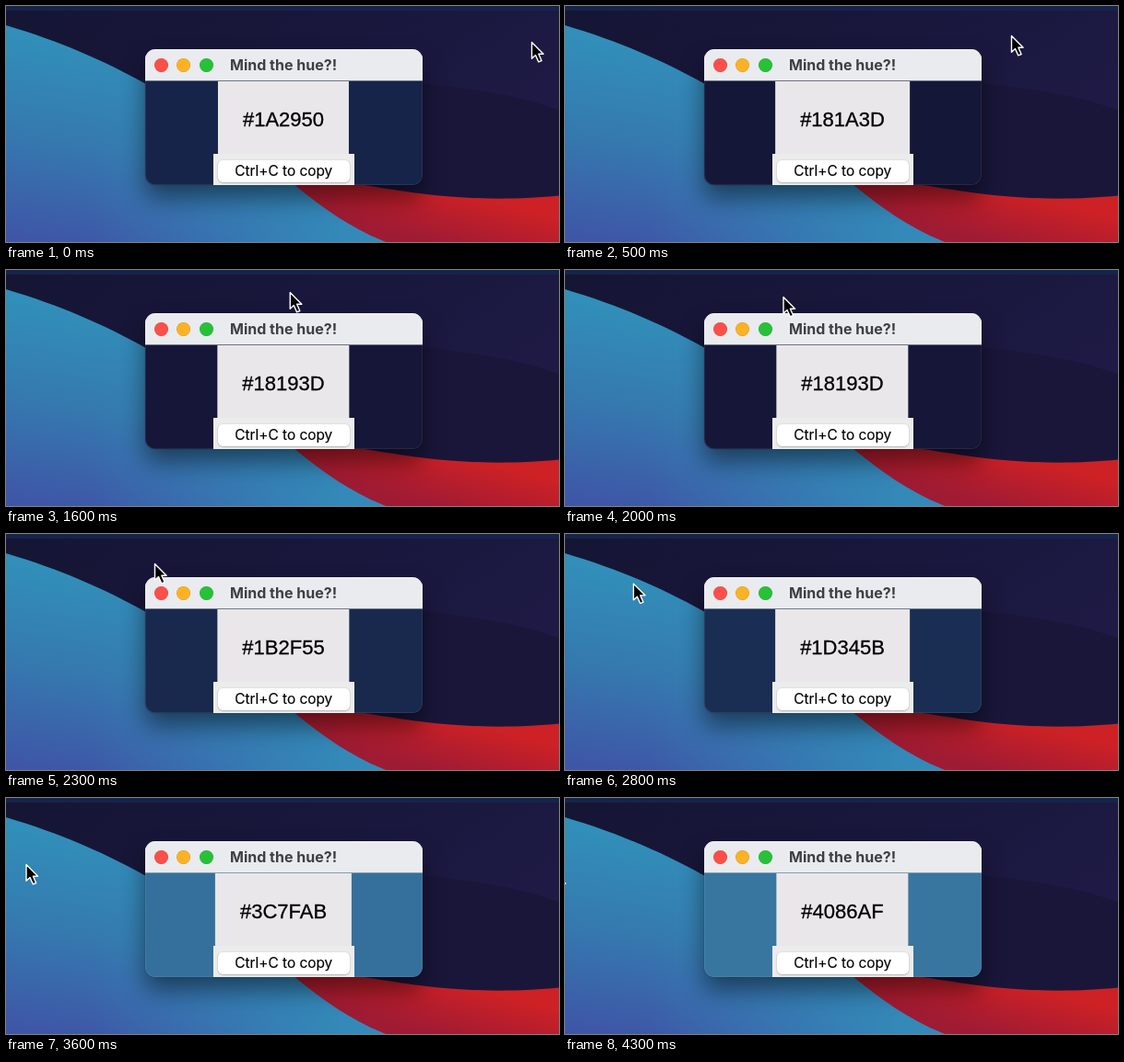
These frames come from a looping animation (600 px wide and 257 px high, 4.4 s). An HTML page:

```html
<!DOCTYPE html>
<html lang="en">
<head>
<meta charset="utf-8">
<title>Colour picker</title>
<style>
  html, body { margin: 0; width: 100%; height: 100%; overflow: hidden; background: #19163a; }
  #stage { position: relative; width: 600px; height: 257px; overflow: hidden; }
  #stage > svg { position: absolute; left: 0; top: 0; }
  #window, #shadow {
    position: absolute; left: 151px; top: 47px; width: 301px; height: 147.5px; border-radius: 11px;
  }
  #window { overflow: hidden; }
  #shadow { box-shadow: 0 14px 26px rgba(0, 0, 0, .48), 0 0 1px rgba(0, 0, 0, .6); }
  #bar { position: absolute; inset: 0 0 auto; height: 34px; background: #e9ebee; box-shadow: 0 .5px 0 #c9c9cd; }
  #bar i { position: absolute; top: 10px; width: 15px; height: 15px; border-radius: 50%; box-shadow: inset 0 0 0 .5px rgba(0, 0, 0, .15); }
  #bar b { position: absolute; left: 92px; top: 6.5px; font: 700 16px/21px Inter, sans-serif; color: #3e3f42; white-space: pre; }
  #label {
    position: absolute; left: 150px; top: 34.5px; height: 80px; padding: 0 27px;
    transform: translateX(-50%); background: #e9e7e9; color: #000;
    font: 22px/83px "Liberation Sans", Arial, sans-serif; white-space: pre;
    -webkit-text-stroke: .3px #000;
  }
  #foot { position: absolute; left: 74px; top: 113.5px; width: 153px; height: 34px; background: #ececec; }
  #foot span {
    position: absolute; left: 5px; top: 7.5px; width: 142.5px; height: 24px; border-radius: 5px;
    background: #fff; box-shadow: 0 .5px 1.5px rgba(0, 0, 0, .4);
    font: 15.4px/24px Inter, sans-serif; color: #000; text-align: center; white-space: pre;
    -webkit-text-stroke: .15px #000;
  }
  #rim { position: absolute; inset: 0; border-radius: 11px; box-shadow: inset 0 0 0 .7px rgba(255, 255, 255, .1); }
</style>
</head>
<body>
<div id="stage">
  <svg width="600" height="257" viewBox="0 0 600 257">
    <defs>
      <linearGradient id="night" x1="0" y1="0" x2="1" y2=".6">
        <stop offset="0" stop-color="#151534"/><stop offset=".5" stop-color="#19173c"/><stop offset="1" stop-color="#1f1b48"/>
      </linearGradient>
      <linearGradient id="sea" gradientUnits="userSpaceOnUse" x1="70" y1="40" x2="35" y2="275">
        <stop offset="0" stop-color="#318fb9"/><stop offset=".45" stop-color="#3579af"/><stop offset="1" stop-color="#4050a5"/>
      </linearGradient>
      <linearGradient id="glow" gradientUnits="userSpaceOnUse" x1="90" y1="0" x2="370" y2="0">
        <stop offset="0" stop-color="#3385b6" stop-opacity="0"/><stop offset="1" stop-color="#338ab9"/>
      </linearGradient>
      <linearGradient id="flame" gradientUnits="userSpaceOnUse" x1="490" y1="203" x2="475" y2="260">
        <stop offset="0" stop-color="#cd2125"/><stop offset=".4" stop-color="#bb1e2b"/><stop offset="1" stop-color="#9f1b34"/>
      </linearGradient>
      <path id="wave" d="M0 21C60 39 105 59 151 84.5C230 128 270 160 313 195C345 221 374 242 412 257H0Z"/>
    </defs>
    <rect width="600" height="257" fill="url(#night)"/>
    <path d="M380 82C450 82 490 88 530 95S580 107 600 113V257H380Z" fill="#1a163a"/>
    <path d="M290 178C350 189 410 199 452 204.5C510 211.5 560 210.5 600 206.5V257H290Z" fill="url(#flame)"/>
    <use href="#wave" fill="url(#sea)"/>
    <use href="#wave" fill="url(#glow)"/>
    <rect width="600" height="5" fill="#15244a"/>
  </svg>
  <div id="shadow"></div>
  <div id="window">
    <div id="bar">
      <i style="left:9.5px;background:#fc4f49"></i>
      <i style="left:34px;background:#fdb224"></i>
      <i style="left:58.5px;background:#27c138"></i>
      <b>Mind the hue?!</b>
    </div>
    <div id="label"></div>
    <div id="foot"><span>Ctrl+C to copy</span></div>
    <div id="rim"></div>
  </div>
  <svg width="600" height="257" viewBox="0 0 600 257">
    <path id="cursor" d="M0 .6V18.2L4 14.5L7.3 21.9L10.6 20.5L7.4 13.2H12.6Z"
      fill="#000" stroke="#fff" stroke-width="1.4" stroke-linejoin="round"/>
  </svg>
</div>
<script>
  const LOOP = 4400, STEP = 100;

  // time, x, y of the pointer tip
  const path = [
    [0, 570.5, 39], [500, 484.5, 32], [1200, 379.5, 19], [2000, 237, 29], [2300, 161.5, 32],
    [2400, 138, 36], [2700, 85, 50], [3000, 53, 61], [3200, 40.5, 65], [3600, 22, 72],
    [4200, -9, 79], [4300, -12, 80]
  ];

  // time, sampled colour
  const samples = [
    [0, '1A2950'], [300, '181A3D'], [1600, '18193D'], [2200, '1B2F55'],
    [2700, '1D345B'], [3500, '3C7FAB'], [3900, '4086AF']
  ];

  const label = document.getElementById('label');
  const body = document.getElementById('window');
  const cursor = document.getElementById('cursor');

  function pointAt(t) {
    const next = path.findIndex(p => p[0] > t);
    if (next < 0) return path[path.length - 1].slice(1);
    const [a, b] = [path[next - 1], path[next]];
    const k = (t - a[0]) / (b[0] - a[0]);
    return [1, 2].map(i => a[i] + (b[i] - a[i]) * k);
  }

  // The display profile renders the sampled value slightly darker.
  function shown(hex) {
    const rgb = [0, 2, 4].map((i, n) => parseInt(hex.slice(i, i + 2), 16) * [.88, .88, .91][n]);
    return `rgb(${rgb.map(Math.round)})`;
  }

  function draw(now) {
    const t = Math.floor(now % LOOP / STEP) * STEP;
    const [x, y] = pointAt(t);
    const hex = samples.filter(s => s[0] <= t).pop()[1];
    cursor.setAttribute('transform', `translate(${x} ${y})`);
    label.textContent = '#' + hex;
    body.style.background = shown(hex);
  }

  const start = performance.now();
  function tick() {
    draw(performance.now() - start);
    requestAnimationFrame(tick);
  }
  tick();
</script>
</body>
</html>
```
